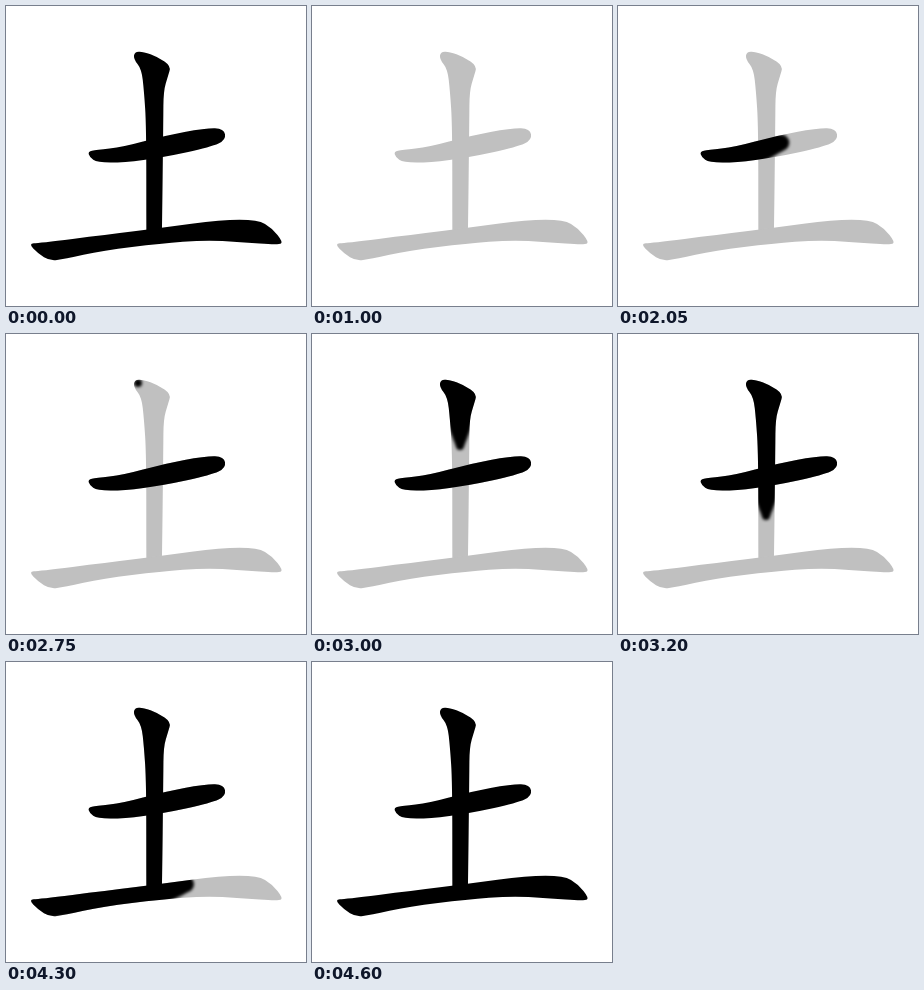
Animation, 300 px wide and 300 px high, one loop 5600 ms. Source, as an HTML page with a canvas:

```html
<!DOCTYPE html>
<html lang="en">
<head>
<meta charset="utf-8">
<title>Stroke order</title>
<style>
html, body { margin: 0; width: 100%; height: 100%; overflow: hidden; background: #fff; }
canvas { display: block; width: 300px; height: 300px; }
</style>
</head>
<body>
<canvas id="stage" width="300" height="300"></canvas>
<script>
const LOOP = 5600, GREY_FROM = 1000, DONE = 4600;
const GREY = '#c0c0c0', INK = '#000';
const ctx = document.getElementById('stage').getContext('2d');

// Closed smooth outline: each key point bends the curve between edge midpoints.
function outline(text) {
  const pts = text.split(' ').map(p => p.split(',').map(Number));
  const next = i => pts[(i + 1) % pts.length];
  const mid = ([ax, ay], [bx, by]) => [(ax + bx) / 2, (ay + by) / 2];
  const path = new Path2D();
  path.moveTo(...mid(pts[pts.length - 1], pts[0]));
  pts.forEach((p, i) => path.quadraticCurveTo(...p, ...mid(p, next(i))));
  path.closePath();
  return path;
}

// The brush walks its spine in equal steps; tip is the radius at its head.
const strokes = [
  {
    shape: outline('82,145.5 83.5,151 91,156.5 118,156.5 157,151.3 205,141 220,134 218,122.5 200,122 157,130 117,141 90,144'),
    spine: [[88, 148], [214, 129]],
    tip: 8, start: 1750, end: 2250, steps: 5
  },
  {
    shape: outline('128.5,46 137,45.5 152,51 165,60 162,70 157.5,85 157.3,115 156,226 155.5,236 140.5,236 140.3,226 140.3,120 138,85 135.5,63 127.5,53'),
    spine: [[132, 49], [148, 64], [148, 217]],
    tip: 4, start: 2750, end: 3300, steps: 5
  },
  {
    shape: outline('22.5,237.5 33,237 100,228.8 156,221.8 215,213.8 252,213.8 266,222 277,236 273,239 234,236 199,234 155,237.5 97,244.5 58,253 44,255 32,247.5'),
    spine: [[29, 240], [190, 221], [271, 228]],
    tip: 8, start: 3800, end: 4600, steps: 8
  }
];

// Round dabs along the spine, narrowing towards the head.
function brush({ spine, tip }, progress) {
  const legs = spine.slice(1).map(([x, y], i) => {
    const [x0, y0] = spine[i];
    return { x0, y0, dx: x - x0, dy: y - y0, len: Math.hypot(x - x0, y - y0) };
  });
  let left = progress * legs.reduce((sum, leg) => sum + leg.len, 0);
  const dabs = new Path2D();
  for (const { x0, y0, dx, dy, len } of legs) {
    for (let d = 0; d <= Math.min(len, left); d++) {
      const x = x0 + dx * d / len, y = y0 + dy * d / len;
      const r = Math.min(18, tip + 0.35 * (left - d));
      dabs.moveTo(x + r, y);
      dabs.arc(x, y, r, 0, 2 * Math.PI);
    }
    left -= len;
  }
  return dabs;
}

function fillAll(color) {
  ctx.fillStyle = color;
  for (const s of strokes) ctx.fill(s.shape);
}

function paint(stroke, t) {
  const { shape, start, end, steps } = stroke;
  if (t < start) return;
  ctx.fillStyle = INK;
  if (t >= end) return ctx.fill(shape);
  const step = Math.floor(steps * (t - start) / (end - start));
  ctx.save();
  ctx.clip(shape);
  ctx.filter = 'blur(1.8px)';
  ctx.fill(brush(stroke, step / steps));
  ctx.restore();
}

function draw(t) {
  ctx.fillStyle = '#fff';
  ctx.fillRect(0, 0, 300, 300);
  if (t < GREY_FROM || t >= DONE) return fillAll(INK);
  fillAll(GREY);
  for (const s of strokes) paint(s, t);
}

const t0 = performance.now();
function tick() {
  draw((performance.now() - t0) % LOOP);
  requestAnimationFrame(tick);
}
tick();
</script>
</body>
</html>
```
